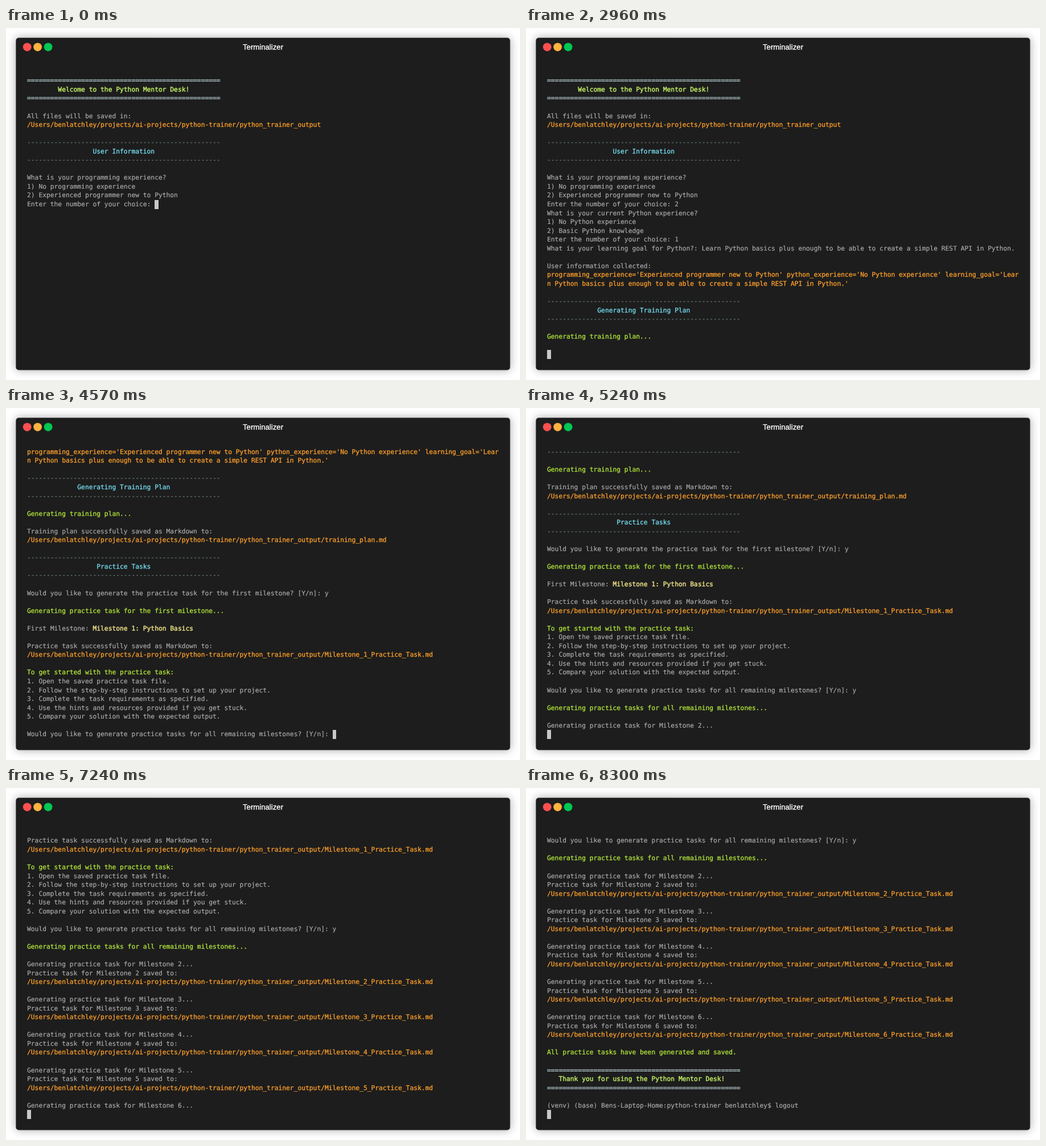
An HTML page that plays this animation: 903x620 px, repeating every 8500 ms.

```html
<!DOCTYPE html>
<html lang="en">
<head>
<meta charset="utf-8">
<title>Terminal session</title>
<style>
  html, body { margin: 0; width: 100%; height: 100%; overflow: hidden; background: #fff; }
  svg { position: absolute; left: 0; top: 0; }
  rect { fill: #1d1d1d; filter: drop-shadow(0 0 7.5px rgba(0, 0, 0, .35)); }
  h1 {
    position: absolute; left: 0; top: 26px; width: 903px; margin: 0; text-align: center;
    font: 13.2px/16px "Liberation Sans", Arial, sans-serif; color: #fff;
    text-rendering: geometricPrecision; -webkit-text-stroke: .35px;
  }
  #screen {
    position: absolute; left: 37px; top: 69.8px; margin: 0; white-space: pre;
    font: 11.29px/15.55px "DejaVu Sans Mono", monospace; color: #afafaf;
    text-rendering: geometricPrecision; font-variant-ligatures: none;
    -webkit-text-stroke: .15px;
  }
  #screen div { height: 15.55px; }
  .path { color: #ffa02b; }
  .ok { color: #b3e83b; }
  .head { color: #75dff2; }
  .dash { color: #708387; }
  .rule { color: #b1c6ca; }
  .title { color: #c0ee66; }
  .name { color: #ebdf86; }
  .path, .ok, .head { -webkit-text-stroke: .3px; }
  .title, .name, .rule { -webkit-text-stroke: .45px; }
  .cursor { display: inline-block; height: 15.55px; vertical-align: top; background: #c7c7c7; }
</style>
</head>
<body>
<svg width="903" height="620">
  <rect x="17.4" y="17.3" width="868.2" height="585.2" rx="5"/>
  <circle cx="37.2" cy="33.6" r="7.4" fill="#ff504f"/>
  <circle cx="55.6" cy="33.6" r="7.4" fill="#ffb342"/>
  <circle cx="74.1" cy="33.6" r="7.4" fill="#00c853"/>
</svg>
<h1>Terminalizer</h1>
<div id="screen"></div>
<script>
const LOOP = 8500, ROWS = 33, WIDTH = 50;
const OUT = '/Users/benlatchley/projects/ai-projects/python-trainer/python_trainer_output';
const GOAL = 'Learn Python basics plus enough to be able to create a simple REST API in Python.';

const center = s => ' '.repeat((WIDTH - s.length) >> 1) + s;
const path = file => [OUT + file, 'path'];
const ok = s => [s, 'ok'];
const boxed = (s, edge, edgeClass, textClass) => {
  const line = [edge.repeat(WIDTH), edgeClass];
  return [line, [center(s), textClass], line];
};
const banner = s => boxed(s, '=', 'rule', 'title');
const section = s => boxed(s, '-', 'dash', 'head');
const task = n => [
  `Generating practice task for Milestone ${n}...`,
  `Practice task for Milestone ${n} saved to:`,
  path(`/Milestone_${n}_Practice_Task.md`),
  ''
];

// A line is plain text, or [text, class, plain prefix].
const lines = [
  '',
  ...banner('Welcome to the Python Mentor Desk!'),
  '',
  'All files will be saved in:',
  path(''),
  '',
  ...section('User Information'),
  '',
  'What is your programming experience?',
  '1) No programming experience',
  '2) Experienced programmer new to Python',
  'Enter the number of your choice: 2',
  'What is your current Python experience?',
  '1) No Python experience',
  '2) Basic Python knowledge',
  'Enter the number of your choice: 1',
  'What is your learning goal for Python?: ' + GOAL,
  '',
  'User information collected:',
  ["programming_experience='Experienced programmer new to Python' python_experience='No Python experience' learning_goal='" + GOAL.slice(0, 4), 'path'],
  [GOAL.slice(4) + "'", 'path'],
  '',
  ...section('Generating Training Plan'),
  '',
  ok('Generating training plan...'),
  '',
  'Training plan successfully saved as Markdown to:',
  path('/training_plan.md'),
  '',
  ...section('Practice Tasks'),
  '',
  'Would you like to generate the practice task for the first milestone? [Y/n]: y',
  '',
  ok('Generating practice task for the first milestone...'),
  '',
  ['Milestone 1: Python Basics', 'name', 'First Milestone: '],
  '',
  'Practice task successfully saved as Markdown to:',
  path('/Milestone_1_Practice_Task.md'),
  '',
  ok('To get started with the practice task:'),
  '1. Open the saved practice task file.',
  '2. Follow the step-by-step instructions to set up your project.',
  '3. Complete the task requirements as specified.',
  '4. Use the hints and resources provided if you get stuck.',
  '5. Compare your solution with the expected output.',
  '',
  'Would you like to generate practice tasks for all remaining milestones? [Y/n]: y',
  '',
  ok('Generating practice tasks for all remaining milestones...'),
  '',
  ...[2, 3, 4, 5, 6].flatMap(task),
  ok('All practice tasks have been generated and saved.'),
  '',
  ...banner('Thank you for using the Python Mentor Desk!'),
  '',
  '(venv) (base) Bens-Laptop-Home:python-trainer benlatchley$ logout',
  ''
];

// [start ms, cursor line, cursor column]
const steps = [
  [0, 15, 33], [860, 19, 33], [1360, 19, 34], [1860, 20, 40],
  [2360, 20, 72], [2460, 20, 121], [2960, 32, 0], [3460, 39, 77],
  [3960, 39, 78], [4070, 45, 0], [4570, 55, 79], [5070, 55, 80],
  [5240, 60, 0], [5740, 64, 0], [6240, 68, 0], [6740, 72, 0],
  [7240, 76, 0], [7740, 85, 0], [7800, 85, 59], [8300, 86, 0]
];

const screen = document.getElementById('screen');
const markup = line => {
  if (typeof line === 'string') return line;
  const [text, cls, prefix = ''] = line;
  return `${prefix}<span class="${cls}">${text}</span>`;
};

function render([, row, col]) {
  const shown = lines.slice(Math.max(0, row - ROWS + 1), row).map(markup);
  const typed = col ? lines[row].slice(0, col) : '';
  shown.push(typed + '<span class="cursor"> </span>');
  screen.innerHTML = shown.map(s => `<div>${s}</div>`).join('');
}

let current;
function tick() {
  const t = performance.now() % LOOP;
  const step = steps.findLast(s => s[0] <= t);
  if (step !== current) render(current = step);
  requestAnimationFrame(tick);
}
tick();
</script>
</body>
</html>
```
